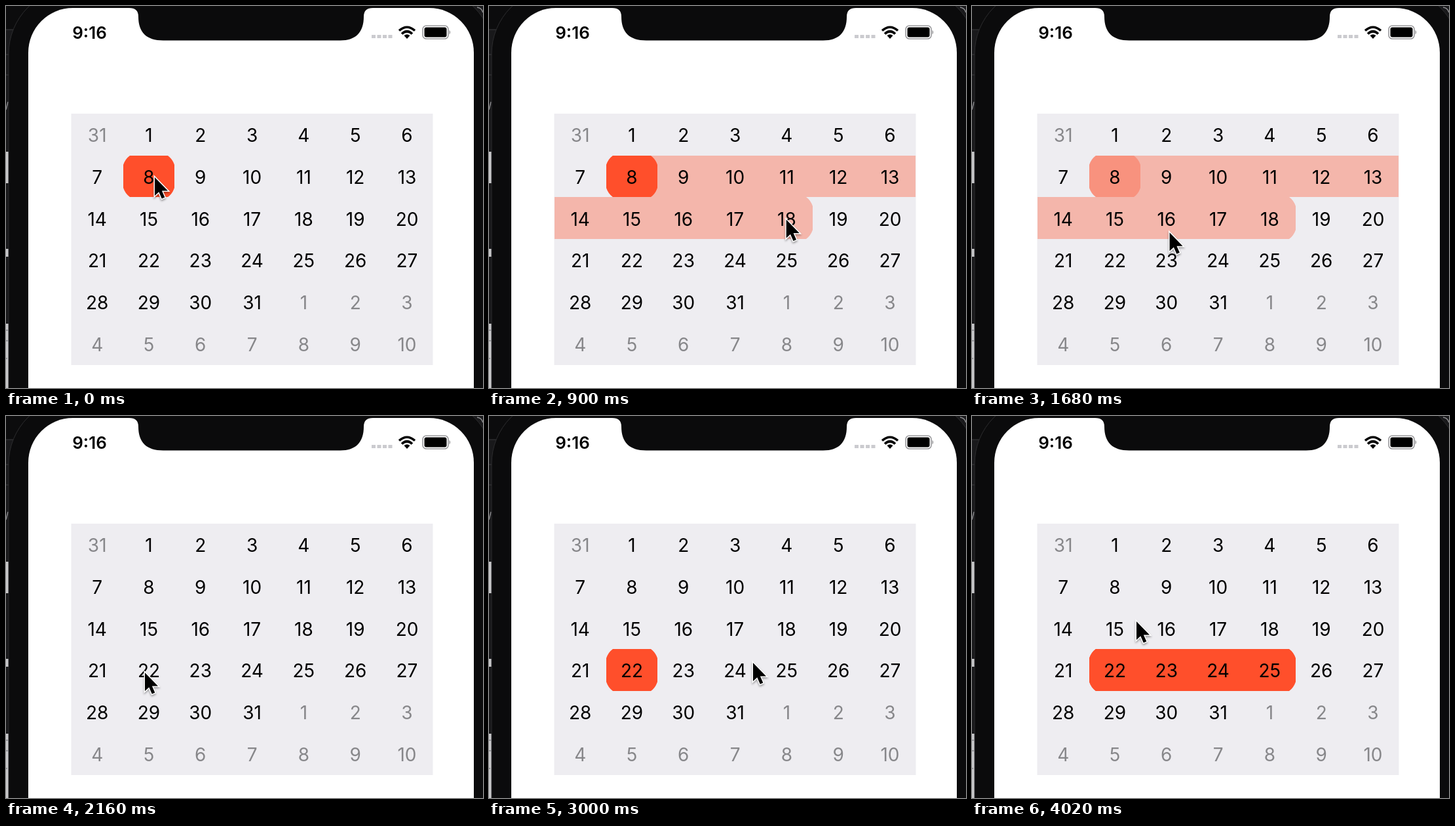
An HTML page that plays this animation: 728x582 px, repeating every 4080 ms.

```html
<!DOCTYPE html>
<html lang="en">
<head>
<meta charset="utf-8">
<title>Date range picker</title>
<style>
  html, body { margin: 0; width: 100%; height: 100%; overflow: hidden; background: #0b0b0c; }
  svg { display: block; width: 728px; height: 582px; }
  text { font-family: Inter, sans-serif; text-anchor: middle; }
  #days { font-size: 28px; }
  #cursor { paint-order: stroke; filter: drop-shadow(0 2px 1.5px rgba(0, 0, 0, .35)); }
</style>
</head>
<body>
<svg viewBox="0 0 728 582">
  <!-- desktop behind the phone -->
  <rect width="728" height="582" fill="#19191b"/>
  <path d="M0 0H40V36H0Z" fill="#0c0c0d"/>
  <path d="M0 36H12M0 74H6M0 105H5" stroke="#3a3a3c"/>
  <path d="M0 222H4V270H0ZM0 370H4V382H0ZM0 484H4V582H0Z" fill="#c9c9cb"/>
  <path d="M0 158L3 146M0 494H3M0 510H3M0 537H2" stroke="#8b8b8e" stroke-width="1.5" fill="none"/>
  <path d="M719 2Q726 3 728 10" stroke="#8b8b8e" stroke-width="1.5" fill="none"/>

  <!-- phone -->
  <rect x="4" y="-27" width="740" height="800" rx="100" fill="#0b0b0c" stroke="#2c2c2e"/>
  <rect x="34" y="3" width="680" height="700" rx="68" fill="#fff"/>
  <path d="M188 2V3Q202 3 202 16C202 40 214 52.5 240 52.5H510C534 52.5 546 40 546 16Q546 3 560 3V2Z" fill="#0b0b0c"/>

  <!-- status bar -->
  <text x="127.5" y="49.5" font-size="26" font-weight="600">9:16</text>
  <path d="M558 46.5H590" stroke="#cbcbcf" stroke-width="5" stroke-dasharray="6 2.5"/>
  <g fill="none" stroke="#000" stroke-width="3.6">
    <path d="M600 37.5Q612 27 624 37.5M604 42.5Q612 35 620 42.5"/>
    <path d="M607.5 45Q612 41.5 616.5 45L612 50Z" fill="#000" stroke="none"/>
  </g>
  <rect x="636" y="30" width="39" height="20" rx="5.5" fill="none" stroke="#9a9a9d" stroke-width="1.6"/>
  <rect x="638.5" y="32.5" width="34" height="15" rx="3"/>
  <path d="M676.5 36.5Q680 40 676.5 43.5Z" fill="#9a9a9d"/>

  <!-- calendar -->
  <rect x="99.5" y="164" width="552" height="383" fill="#eeedf1"/>
  <g id="ranges" fill="#ff4f2b"></g>
  <g id="days"></g>
  <path id="cursor" d="M0 0V28L6.3 22.3L10.8 32.5L15.3 30.5L10.9 20.5H20Z" stroke="#fff" stroke-width="3"/>
</svg>
<script>
const LOOP = 4080, STEP = 60, FADE = 300;
const LEFT = 99.8, TOP = 163.7, W = 78.8, H = 63.85;
const $ = id => document.getElementById(id);

function add(parent, tag, attrs, text = '') {
  const el = document.createElementNS('http://www.w3.org/2000/svg', tag);
  for (const key in attrs) el.setAttribute(key, attrs[key]);
  el.textContent = text;
  return parent.appendChild(el);
}

for (let i = 0; i < 42; i++) {
  const inMonth = i > 0 && i < 32;
  add($('days'), 'text', {
    x: LEFT + (i % 7 + .5) * W,
    y: TOP + (Math.floor(i / 7) + .5) * H + 11.3,
    fill: inMonth ? '#000' : '#87878a'
  }, i === 0 ? 31 : inMonth ? i : i - 31);
}

const edgeX = col => Math.round(LEFT + col * W);
const edgeY = row => Math.round(TOP + row * H);

// One strip of selected days; only the ends of a range are rounded.
function strip(row, from, to, roundStart, roundEnd) {
  const l = edgeX(from), r = edgeX(to + 1), t = edgeY(row), b = edgeY(row + 1);
  const start = roundStart
    ? `M${l + 10} ${b}Q${l + 3} ${b - 5} ${l} ${b - 14}V${t + 14}Q${l + 3} ${t + 5} ${l + 10} ${t}`
    : `M${l} ${b}V${t}`;
  const end = roundEnd
    ? `H${r - 10}Q${r - 3} ${t + 5} ${r} ${t + 14}V${b - 14}Q${r - 3} ${b - 5} ${r - 10} ${b}Z`
    : `H${r}V${b}Z`;
  return start + end;
}

function rangePath(first, last) {
  let d = '';
  for (let row = Math.floor(first / 7); row * 7 <= last; row++) {
    const a = Math.max(first, row * 7), b = Math.min(last, row * 7 + 6);
    d += strip(row, a % 7, b % 7, a === first, b === last);
  }
  return d;
}

// first day, last day, shown at, hidden at
const ranges = [
  [8, 8, -FADE, 1500],
  [8, 18, 840, 1500],
  [22, 22, 2340, LOOP],
  [22, 25, 3420, LOOP]
].map(([first, last, show, hide]) =>
  ({ show, hide, el: add($('ranges'), 'path', { d: rangePath(first, last) }) }));

const clamp = v => Math.min(1, Math.max(0, v));
const smooth = v => v * v * (3 - 2 * v);
const linear = v => v;
const easeOut = v => 1 - (1 - v) ** 2;

// time, x, y, easing used to get there
const path = [
  [0, 227, 261, linear],
  [180, 227, 261, linear],
  [660, 459, 324, smooth],
  [840, 459, 324, linear],
  [1080, 425, 334, smooth],
  [1380, 343, 320, smooth],
  [1560, 322, 328, easeOut],
  [1860, 264, 377, smooth],
  [2160, 212, 391, easeOut],
  [2520, 212, 391, linear],
  [2820, 221, 332, smooth],
  [3000, 403, 376, linear],
  [3300, 457, 392, easeOut],
  [3720, 457, 392, linear],
  [3900, 344, 342, smooth],
  [4020, 251, 313, linear],
  [LOOP, 251, 313, linear]
];

function cursorAt(t) {
  const i = path.findIndex(p => p[0] > t);
  const [t0, x0, y0] = path[i - 1], [t1, x1, y1, ease] = path[i];
  const k = ease((t - t0) / (t1 - t0));
  return [x0 + (x1 - x0) * k, y0 + (y1 - y0) * k];
}

function draw() {
  const t = Math.floor(performance.now() % LOOP / STEP) * STEP;
  for (const { show, hide, el } of ranges) {
    const shown = clamp((t + STEP - show) / FADE), hidden = clamp((t - hide) / FADE);
    el.setAttribute('opacity', t < show ? 0 : smooth(shown) * (1 - smooth(hidden)));
  }
  $('cursor').setAttribute('transform', `translate(${cursorAt(t)})`);
  requestAnimationFrame(draw);
}
draw();
</script>
</body>
</html>
```
